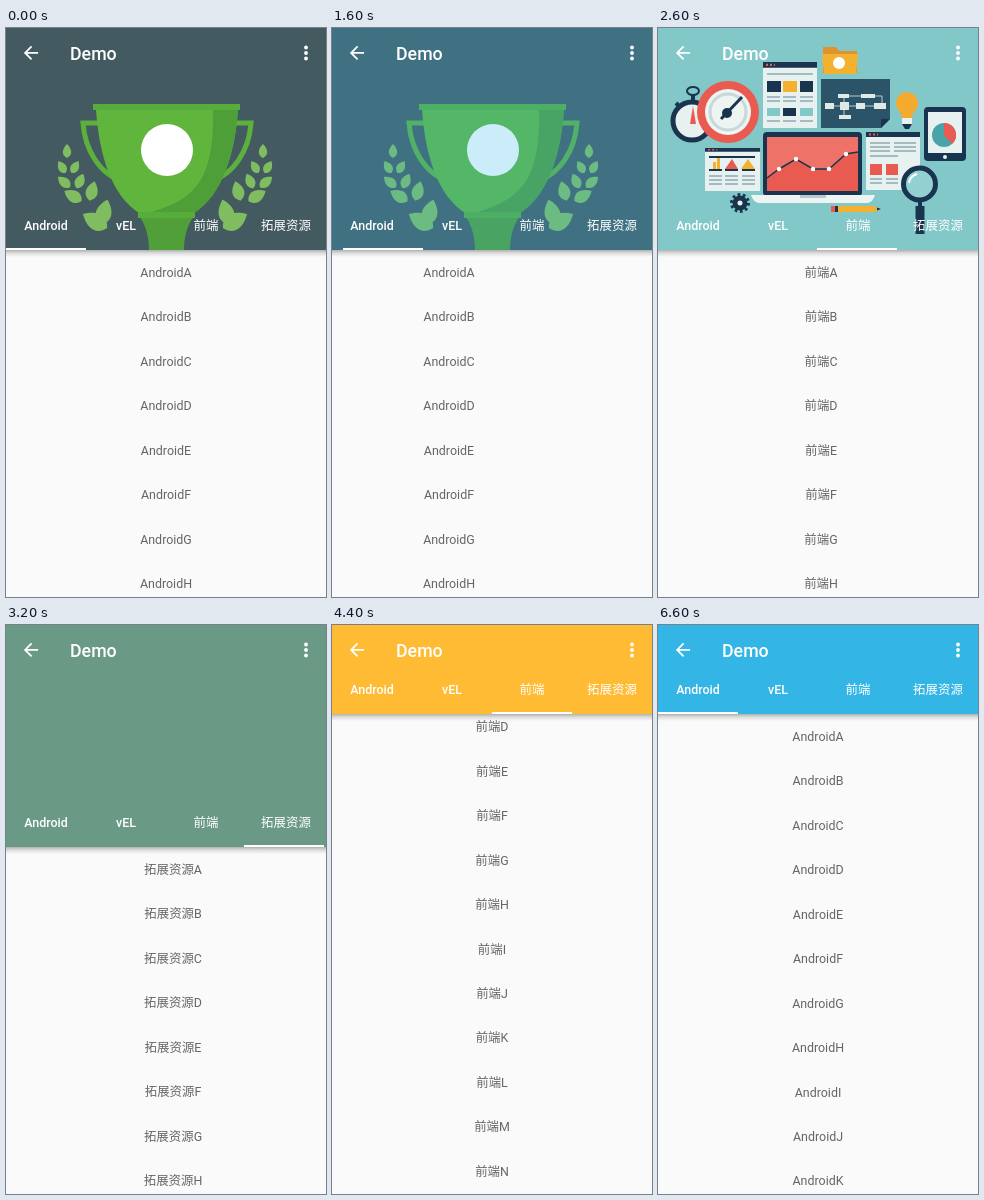
Animation of 320 by 569 pixels, one loop 6.7 s. Source, as an HTML page:

```html
<!DOCTYPE html>
<html lang="en">
<head>
<meta charset="utf-8">
<title>Demo</title>
<style>
  html, body { margin: 0; width: 100%; height: 100%; overflow: hidden; background: #fafafa; }
  #stage { display: block; width: 100vw; height: 100vh; }
  text { font: 12.44px Roboto, "Noto Sans CJK SC", "Noto Sans CJK", sans-serif; }
  #lists { fill: #666; text-anchor: middle; }
  #tabs { fill: #fff; text-anchor: middle; }
  #tabs text:nth-child(-n+2) { font-weight: 500; }
  #title { font-size: 17.78px; font-weight: 500; }
</style>
</head>
<body>
<svg id="stage" viewBox="0 0 320 569">
  <defs>
    <linearGradient id="shade" x2="0" y2="1">
      <stop stop-opacity=".3"/>
      <stop offset=".4" stop-opacity=".13"/>
      <stop offset="1" stop-opacity="0"/>
    </linearGradient>
    <g id="sheet">
      <path fill="#e6f1f0" d="M0 0H54V58H0z"/>
      <path fill="#19344e" d="M0 0H54V5H0z"/>
      <path stroke="#e95b50" stroke-width="2" stroke-dasharray="2 2" d="M3 2.500h9"/>
    </g>
  </defs>

  <g id="lists"></g>
  <rect id="shadow" width="320" height="7" fill="url(#shade)"/>

  <svg id="head" width="320">
    <rect id="back" width="320" height="223"/>
    <g id="image">
      <g>
        <path fill="#445a61" d="M0 0H320V223H0z"/>
        <path fill="none" stroke="#5cb03c" stroke-width="5" d="M92 95H77C79 122 94 147 117 153M229 95H245C243 122 228 147 204 153"/>
        <path fill="#60b63c" d="M90 81H232C229 128 215 168 188 185H133C106 168 93 128 90 81z"/>
        <path fill="#4f9f38" d="M207 81H232C229 128 215 168 188 185H143C183 172 209 160 207 81z"/>
        <path fill="#519f38" d="M134 189H187C180 200 178 211 178 223H143C143 211 141 200 134 189z"/>
        <path fill="#57ad3b" d="M87 76H234V82H87zM132 184H189V190H132z"/>
        <circle cx="161" cy="122" r="26" fill="#fff"/>
        <g id="leaves" fill="#7fbd60"></g>
        <use href="#leaves" transform="matrix(-1 0 0 1 318 0)"/>
      </g>
      <path fill="#59646f" d="M0 0H320V223H0z"/>
      <g>
        <path fill="#83c8c9" d="M0 0H320V223H0z"/>
        <!-- stopwatch and gauge -->
        <g fill="none" stroke="#19344e">
          <circle cx="34" cy="93" r="19" fill="#e6f1f0" stroke-width="5"/>
          <ellipse cx="35" cy="63" rx="6" ry="4" stroke-width="2"/>
          <path stroke-width="4" d="M35 66V73M18 75L21 78M49 73L46 76"/>
        </g>
        <path fill="#e95b50" d="M35 78L38 96H32z"/>
        <circle cx="70" cy="84" r="31" fill="#e95b50"/>
        <circle cx="70" cy="84" r="23" fill="#eef4f2"/>
        <circle cx="70" cy="84" r="18" fill="none" stroke="#c6d8d9" stroke-width="3"/>
        <path stroke="#19344e" stroke-width="3" d="M63 91L84 69"/>
        <circle cx="69" cy="85" r="5" fill="#19344e"/>
        <!-- pages -->
        <use href="#sheet" transform="translate(105 34) scale(1 1.14)"/>
        <path fill="#19344e" d="M109 53h14v11h-14zM142 53h13v11h-13zM125 80h13v8h-13z"/>
        <path fill="#f4b02f" d="M125 53h14v11h-14z"/>
        <path fill="#83c8c9" d="M109 80h13v8h-13zM142 80h13v8h-13z"/>
        <path stroke="#8fabb3" stroke-width="1.5" d="M109 46h46M109 69h13m3 0h13m4 0h13M109 73h13m3 0h13m4 0h13M109 93h13m3 0h13m4 0h13"/>
        <use href="#sheet" transform="translate(47 120) scale(1.02 .74)"/>
        <path fill="#f4b02f" d="M51 141h4v-7h3v7h4v-11h-3v11zM83 141l7-10 7 10z"/>
        <path fill="#e95b50" d="M67 141l7-10 6 10z"/>
        <path stroke="#19344e" stroke-width="2" d="M51 129h46M51 142h13m3 0h13m4 0h13"/>
        <path stroke="#8fabb3" stroke-width="1.5" d="M51 148h13m3 0h13m4 0h13M51 152h13m3 0h13m4 0h13M51 156h13m3 0h13m4 0h13"/>
        <use href="#sheet" x="208" y="104"/>
        <path fill="#e95b50" d="M212 136h12v11h-12zM228 136h12v11h-12z"/>
        <path stroke="#8fabb3" stroke-width="1.5" d="M212 115h20m4 0h22M212 119h20m4 0h22M212 123h20m4 0h22M212 128h28M212 151h12m4 0h12M212 155h12m4 0h12"/>
        <!-- folder and board -->
        <path fill="#e0932a" d="M165 19h13l3 4h18v22h-34z"/>
        <path fill="#f4b02f" d="M164 26h36l-2 20h-32z"/>
        <circle cx="181" cy="35" r="6" fill="#fff"/>
        <path fill="#2b5468" d="M163 51H232V91L223 100H163z"/>
        <path fill="#19344e" d="M232 91h-9v9z"/>
        <path fill="none" stroke="#b9cdd0" d="M170 78H222M186 88V68H224V78"/>
        <path fill="#dfe9e6" d="M167 75h9v6h-9zM182 74h9v8h-9zM198 75h9v6h-9zM216 75h12v6h-12zM180 66h11v4h-11zM203 66h14v4h-14zM181 87h12v4h-12z"/>
        <!-- bulb and tablet -->
        <path fill="#f4a92f" d="M244 90C244 84 238 82 238 75A11 11 0 0 1 260 75C260 82 254 84 254 90z"/>
        <path fill="#e6f1f0" d="M244 90h10v6h-10z"/>
        <path fill="#19344e" d="M244 96h10l-3 5h-4z"/>
        <rect x="266" y="79" width="42" height="54" rx="4" fill="#19344e"/>
        <path fill="#e6f1f0" d="M270 84h34v41h-34z"/>
        <circle cx="287" cy="129" r="2" fill="#e6f1f0"/>
        <circle cx="286" cy="107" r="12" fill="#4aa3a8"/>
        <path fill="#e95b50" d="M286 107V95A12 12 0 0 1 294 116z"/>
        <!-- laptop -->
        <rect x="105" y="104" width="99" height="64" rx="4" fill="#19344e"/>
        <path fill="#e95b50" d="M109 109h91v54h-91z"/>
        <path fill="#ee7268" d="M109 109H200V124L188 126 171 141H155L138 131 121 141 109 150z"/>
        <path fill="none" stroke="#19344e" stroke-width="1.500" d="M109 150L121 141 138 131 155 141 171 141 188 126 200 124"/>
        <path fill="none" stroke="#fff" stroke-width="4.500" stroke-linecap="round" d="M121 141h0M138 131h0M155 141h0M171 141h0M188 126h0"/>
        <path fill="#eef4f2" d="M93 167H217Q215 174 209 175H101Q95 174 93 167z"/>
        <path fill="#b9c9cb" d="M142 167h26v3h-26z"/>
        <!-- gear, pencil, lens -->
        <circle cx="82" cy="175" r="8" fill="none" stroke="#19344e" stroke-width="4" stroke-dasharray="2.513"/>
        <circle cx="82" cy="175" r="5" fill="#e6f1f0" stroke="#19344e" stroke-width="5"/>
        <path fill="#f4b02f" d="M179 178h36l8 3-8 3h-36z"/>
        <path fill="#e95b50" d="M173 178h4v6h-4z"/>
        <path fill="#19344e" d="M177 178h3v6h-3zM219 179.500l4 1.500-4 1.500z"/>
        <circle cx="261.500" cy="156" r="16" fill="#93d0d2" stroke="#19344e" stroke-width="5"/>
        <path stroke="#fff" stroke-width="2" fill="none" d="M251 155A11 11 0 0 1 259 146"/>
        <path stroke="#19344e" stroke-width="9" d="M262 178V206"/>
        <path stroke="#19344e" stroke-width="4" d="M262 172V180"/>
      </g>
      <path fill="#6a9a86" d="M0 0H320V223H0z"/>
    </g>
    <rect id="scrim" width="320" height="223"/>
    <g fill="#fff">
      <path transform="translate(14.300 14.300) scale(.889)" d="M20 11H7.830l5.590-5.590L12 4l-8 8 8 8 1.410-1.410L7.830 13H20z"/>
      <circle cx="300" cy="19.500" r="1.900"/>
      <circle cx="300" cy="25" r="1.900"/>
      <circle cx="300" cy="30.500" r="1.900"/>
      <text id="title" x="64" y="32">Demo</text>
    </g>
    <g id="tabs"></g>
    <rect id="bar" width="80" height="2" fill="#fff"/>
  </svg>
</svg>
<script>
const $ = id => document.getElementById(id);
const names = ['Android', 'vEL', '前端', '拓展资源'];
const colors = ['#33b5e5', '#ff4444', '#ffbb33', '#99cc00'];
const LOOP = 6700, STEP = 100, FULL = 222, RANGE = 133, ROW = 44.44;

// Each move: start, end, from, to
const swipes = [
  [1480, 2000, 0, 1], [2070, 2632, 1, 2], [2680, 3100, 2, 3], [3160, 3600, 3, 2],
  [4880, 5290, 2, 3], [5380, 5780, 3, 2], [5800, 6180, 2, 1], [6200, 6590, 1, 0]
];
const scrolls = [
  [180, 790, 0, 209.5], [880, 1430, 209.5, 0],
  [3600, 4040, 0, 210], [4060, 4700, 210, 330]
];
const fades = [[300, 860, 0, 1], [1240, 1720, 1, 0], [3740, 4340, 0, 1]];

const clamp = u => Math.max(0, Math.min(1, u));
const smooth = u => u * u * (3 - 2 * u);
const linear = u => u;

function follow(moves, t, ease) {
  let value = 0;
  for (const [start, end, from, to] of moves)
    if (t >= start) value = from + (to - from) * ease(clamp((t - start) / (end - start)));
  return value;
}

const label = (s, x, y) => `<text x="${x}" y="${y}">${s}</text>`;

$('lists').innerHTML = names.map(name => '<g>' + Array.from({ length: 26 }, (_, i) =>
  label(name + String.fromCharCode(65 + i), 160, 249 + Math.round(i * ROW))).join('') + '</g>').join('');
$('tabs').innerHTML = names.map((name, i) => label(name, 40 + 80 * i, -20)).join('');

// Leaf: x, y, half length, angle
$('leaves').innerHTML = [
  [61, 123, 7, 0], [56, 139, 7, -30], [69, 139, 7, 30], [58, 154, 8, -50], [74, 153, 8, 25],
  [67, 168, 10, -60], [86, 163, 10, 15], [89, 193, 14, -60], [98, 184, 13, 15]
].map(([x, y, s, a]) => `<path transform="translate(${x} ${y}) rotate(${a}) scale(${s})"
  d="M0-1C.8-.2 .8 .6 0 1C-.8 .6-.8-.2 0-1"/>`).join('');

const lists = [...$('lists').children], images = [...$('image').children];
const set = (id, key, value) => $(id).setAttribute(key, value);
const move = (node, x, y) => node.setAttribute('transform', `translate(${x} ${y})`);

function draw(t) {
  const page = follow(swipes, t, smooth);
  const scroll = Math.round(follow(scrolls, t, smooth));
  const off = Math.min(scroll, RANGE), height = FULL - off;
  const active = t < 2500 ? 0 : 2;

  let picked = 0, since = -LOOP;
  for (const [start, end, , to] of swipes) {
    const middle = (start + end) / 2;
    if (t >= middle) { picked = to; since = middle; }
  }

  lists.forEach((list, i) => move(list, Math.round(320 * (i - page)), i === active ? -scroll : -off));
  images.forEach((image, i) => image.style.display = i === picked ? '' : 'none');
  move($('image'), 0, -off / 2);
  set('image', 'opacity', clamp((t - since) / 240));
  set('back', 'fill', colors[picked]);
  set('scrim', 'fill', colors[picked]);
  set('scrim', 'opacity', follow(fades, t, linear));
  set('head', 'height', height);
  set('shadow', 'y', height);
  move($('tabs'), 0, height);
  set('bar', 'x', Math.round(80 * page));
  set('bar', 'y', height - 2);
}

let origin;
function tick(now) {
  origin ??= now;
  draw(Math.floor((now - origin) % LOOP / STEP) * STEP);
  requestAnimationFrame(tick);
}
draw(0);
requestAnimationFrame(tick);
</script>
</body>
</html>
```
